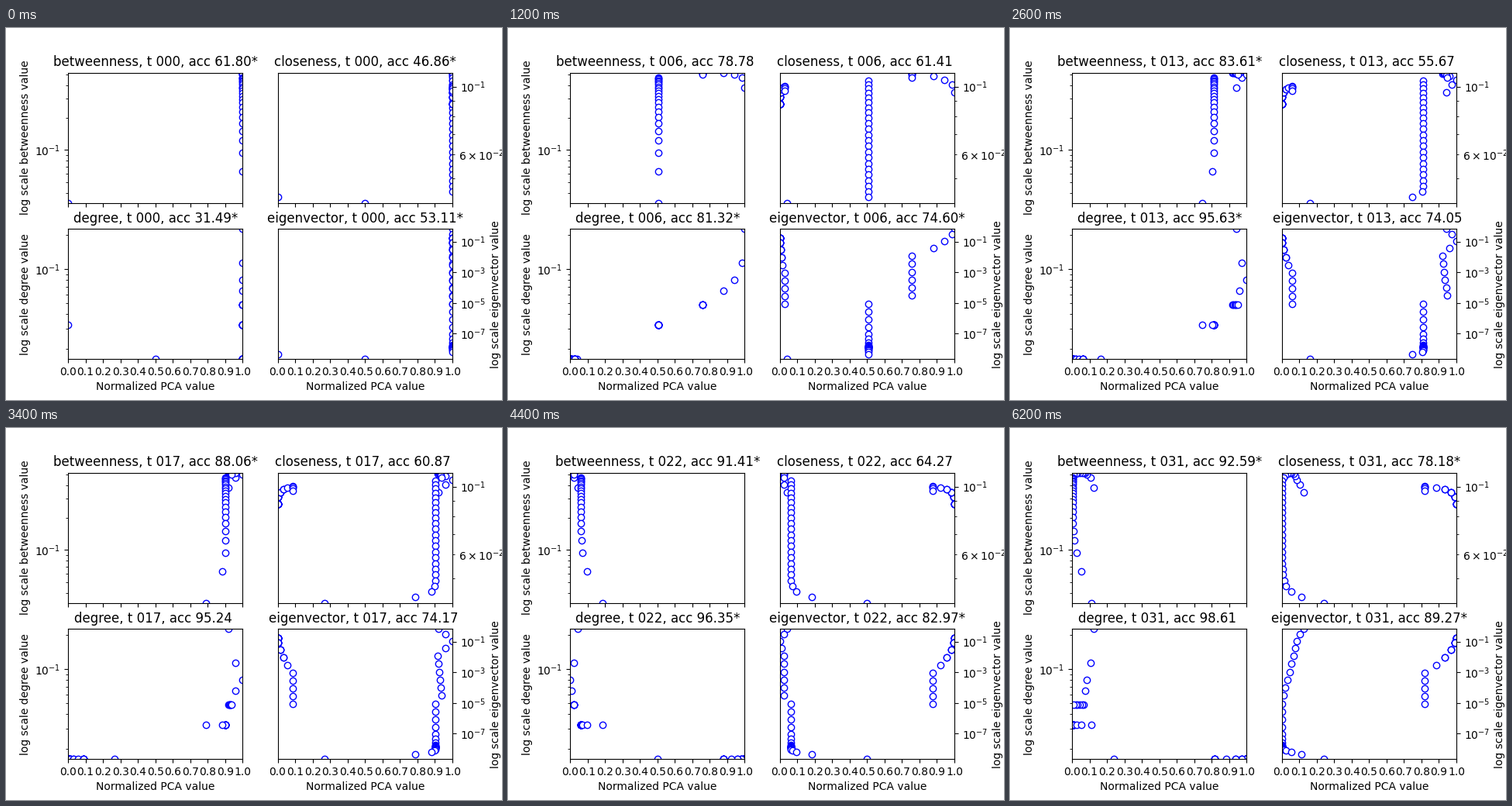
A matplotlib script that plays this animation: 640x480 px, repeating every 6.4 s.

```python
import numpy as np
import matplotlib.pyplot as plt
from matplotlib.animation import FuncAnimation

FRAMES, INTERVAL = 32, 200
SPINE_LEN = 34
FLIP_AT = 20  # the sign of the component reverses here

# Caterpillar tree: a path whose first nodes carry leaves.
leaf_counts = [13, 5, 3, 2] + [1] * 6
leaf_pos = np.repeat(np.arange(10), leaf_counts)
spine = np.arange(SPINE_LEN)
pos = np.r_[spine, leaf_pos]
n = len(pos)
is_leaf = np.arange(n) >= SPINE_LEN

dist = abs(pos[:, None] - pos) + is_leaf[:, None] + is_leaf
np.fill_diagonal(dist, 0)
adjacency = (dist == 1).astype(float)
degree = adjacency.sum(axis=1)


def betweenness():
    scores = []
    for v in range(n):
        on_path = dist[:, v, None] + dist[v] == dist
        on_path[v] = on_path[:, v] = False
        scores.append(on_path.sum() / ((n - 1) * (n - 2)))
    return np.array(scores)


def eigenvector(tol=1e-6):
    x = np.full(n, 1 / n)
    while True:
        last = x
        x = last + adjacency @ last
        x = x / np.linalg.norm(x)
        if abs(x - last).sum() < n * tol:
            return x


measures = {
    "betweenness": betweenness(),
    "closeness": (n - 1) / dist.sum(axis=1),
    "degree": degree / (n - 1),
    "eigenvector": eigenvector(),
}

# How a few spine positions drift once the degrees have separated.
KEY_TIMES = [9, 17, 22, 26, 31]
SPINE_TRACKS = {
    0: [.967, .918, .956, .924, .875],
    2: [1, 1, 1, .964, .914],
    4: [.92, .916, .978, .986, .933],
    9: [.956, .938, .976, .998, .99],
    10: [.72, .902, .937, .968, .997],
}
END_TRACK = [.06, .267, .5, .62, .76]


def spine_values(t):
    if t < KEY_TIMES[0]:
        rate = .393 * (t / 4) ** 1.45
        x = 1 - np.exp(-rate * (degree[:SPINE_LEN] - 1))
        x[-1] = .007 * t
        return x / x.max()
    anchors = [np.interp(t, KEY_TIMES, track) for track in SPINE_TRACKS.values()]
    x = np.interp(spine, list(SPINE_TRACKS), anchors)
    # The far end pulls its neighbours along, fading with distance.
    pull = np.interp(t, KEY_TIMES, END_TRACK) - anchors[-1]
    fade = .02 * (t - 8)
    return x + pull * fade ** (SPINE_LEN - 1 - spine)


def pca_values(t):
    if t == 0:
        x = np.ones(n)
        x[SPINE_LEN - 2:SPINE_LEN] = 0, .5
        return x
    leaf_spread = .0068 * max(t - 4, 4)
    leaves = leaf_spread * np.minimum(leaf_pos / 5, 1) ** 2
    x = np.r_[spine_values(t), leaves]
    return 1 - x if t >= FLIP_AT else x


ACCURACY = {
    "betweenness": ([0, 4, 9, 12, 17, 22, 24, 26, 30, 31],
                    [61.80, 82.04, 73.90, 82.5, 88.06, 91.41, 91.92, 91.48,
                     92.4, 92.59]),
    "closeness": ([0, 4, 9, 17, 22, 26, 31],
                  [46.86, 68.71, 50.47, 60.87, 64.27, 69.99, 78.18]),
    "degree": ([0, 4, 9, 13, 17, 22, 26, 29, 31],
               [31.49, 72.36, 94.76, 95.63, 95.24, 96.35, 96.90, 98.8, 98.61]),
    "eigenvector": ([0, 4, 6, 9, 17, 22, 26, 31],
                    [53.11, 67.40, 74.6, 73.92, 74.17, 82.97, 85.84, 89.27]),
}
accuracy = {name: np.interp(np.arange(FRAMES), *keys)
            for name, keys in ACCURACY.items()}


def draw_title(ax, name, t):
    acc = accuracy[name]
    best = t == 0 or acc[t] > acc[:t].max()
    # Without a star the title sits half a blank further left.
    ax.set_title(f"{name}, t {t:03d}, acc {acc[t]:.2f}{'*' if best else ''}",
                 x=.5 if best else .489)


fig, axes = plt.subplots(2, 2, figsize=(6.4, 4.8), dpi=100)
panels = []
for i, (ax, (name, values)) in enumerate(zip(axes.flat, measures.items())):
    visible = values > 0
    dots, = ax.plot([], [], "o", mfc="w", mec="b", mew=1)
    ax.set_yscale("log")
    ax.set_xlim(0, 1)
    ax.set_ylim(values[visible].min(), values.max())
    ax.set_xticks(np.arange(11) / 10)
    ax.set_ylabel(f"log scale {name} value")
    if i % 2:
        ax.yaxis.tick_right()
        ax.yaxis.set_label_position("right")
    if i < 2:
        ax.tick_params(labelbottom=False)
    else:
        ax.set_xlabel("Normalized PCA value")
    panels.append((ax, name, values, visible, dots))


def update(t):
    x = pca_values(t)
    for ax, name, values, visible, dots in panels:
        dots.set_data(x[visible], values[visible])
        draw_title(ax, name, t)
    return [panel[-1] for panel in panels]


anim = FuncAnimation(fig, update, frames=FRAMES, interval=INTERVAL,
                     repeat=True, repeat_delay=0, blit=False)
plt.show()
```
